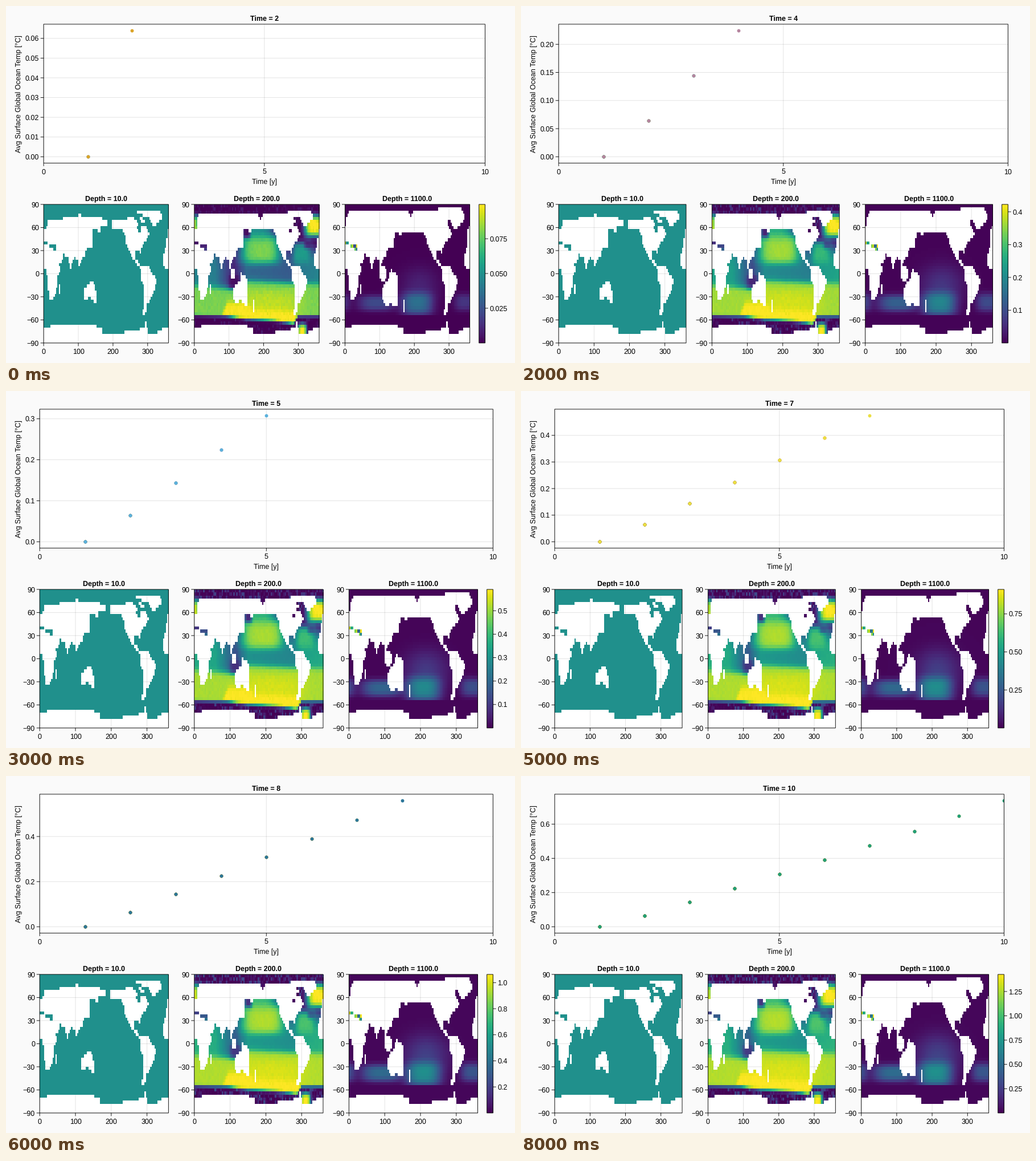
A matplotlib script for the animation above (9000 ms loop, 894 by 626 pixels).

```python
import numpy as np
import matplotlib.pyplot as plt
from matplotlib.animation import FuncAnimation
from matplotlib.patches import Rectangle
from matplotlib.path import Path

W, H, DPI = 894, 626, 64
PX = 72 / DPI
LW = 0.894 * PX
plt.rcParams.update({"font.family": "Liberation Sans", "font.size": 12.516 * PX,
                     "text.hinting": "none"})

TOP, BOTTOM = (31.9, 275.4), (347.9, 590.9)
TEMP = [0, 0.064, 0.144, 0.2246, 0.308, 0.391, 0.4747, 0.5595, 0.648, 0.738]
STEPS = [0.01, 0.05, 0.05, 0.1, 0.1, 0.1, 0.2, 0.2, 0.2]
BAR_STEPS = [0.025, 0.05, 0.1, 0.1, 0.2, 0.25, 0.2, 0.25, 0.25]
CYCLE = ["#2c7699", "#dba428", "#21a077", "#b5859f", "#5bb1dc", "#d95f02", "#ebdf42"]

# 4 degree ocean grid
LON, LAT = np.meshgrid(np.arange(2, 360, 4), np.arange(88, -90, -4))
CELLS = np.column_stack([LON.ravel(), LAT.ravel()])


def inside(*shapes):
    hit = np.zeros(LON.size, bool)
    for s in shapes:
        hit |= Path(s + s[:1]).contains_points(CELLS)
    return hit.reshape(LON.shape)


def grow(mask, n):
    """Widen a mask by n cells in the four directions."""
    for _ in range(n):
        mask = mask | sum(np.roll(mask, d, a) for d in (1, -1) for a in (0, 1)) > 0
    return mask


# coast key points as (longitude, latitude)
OLD_WORLD = [
    (0, 58), (9, 58), (12, 70), (52, 71), (60, 74), (94, 74), (104, 79), (114, 74),
    (150, 74), (183, 70), (183, 62), (163, 60), (163, 52), (156, 57), (142, 58),
    (140, 36), (122, 31), (118, 23), (108, 18), (104, 9), (98, 16), (90, 22), (78, 7),
    (70, 22), (57, 25), (58, 20), (45, 12), (51, 11), (40, -5), (40, -16), (27, -35),
    (19, -35), (12, -16), (9, 4), (0, 5)]
WEST_EDGE = [(360, 58), (354, 58), (356, 48), (351, 42), (351, 36), (343, 21),
             (343, 14), (352, 4), (360, 5)]
MEDITERRANEAN = [(0, 42), (10, 42), (14, 38), (36, 38), (36, 30), (10, 38), (0, 38)]
NORTH_AMERICA = [
    (196, 70), (260, 73), (272, 66), (266, 57), (279, 54), (283, 63), (296, 60),
    (304, 52), (298, 46), (284, 38), (279, 25), (276, 30), (264, 30), (262, 21),
    (272, 18), (281, 8), (277, 7), (262, 16), (248, 28), (236, 39), (235, 48),
    (228, 58), (202, 57), (196, 61)]
GREENLAND = [(268, 82), (336, 82), (340, 71), (316, 59), (309, 66), (303, 75), (268, 77)]
BAFFIN = [(272, 74), (284, 73), (298, 66), (284, 65)]
SOUTH_AMERICA = [(280, 8), (300, 11), (312, 1), (325, -6), (320, -21), (306, -34),
                 (298, -40), (293, -55), (285, -55), (289, -18), (279, -5)]
AUSTRALIA = [(114, -22), (130, -12), (143, -10), (153, -26), (150, -38), (132, -31),
             (115, -35)]
MADAGASCAR = [(44, -16), (50, -13), (47, -26), (43, -26)]
NEW_GUINEA = [(131, 1), (150, -5), (152, -18), (132, -14)]
SUNDA = [(103, 6), (118, 5), (117, -6), (106, -5)]

med = inside(MEDITERRANEAN)
land = inside(OLD_WORLD, WEST_EDGE) & ~med
land |= inside(NORTH_AMERICA, GREENLAND, BAFFIN, SOUTH_AMERICA, AUSTRALIA, MADAGASCAR)
land |= LAT < np.interp(LON, [0, 40, 140, 165, 170, 212, 260, 288, 295, 300, 322, 345],
                        [-70, -66, -66, -70, -78, -78, -73, -71, -62, -78, -78, -70])

# shallow seas turn into land further down
arctic = (LAT > 56) & (LAT < 79) & (LON > 9) & (LON < 285)
indies = (abs(LAT + 16) < 28) & (abs(LON - 126) < 28)
land_mid = land | inside(NEW_GUINEA, SUNDA) | grow(land, 2) & arctic
land_mid |= grow(land, 1) & indies & (LON > 100)
land_mid |= (LON == 170) & (abs(LAT + 41) < 8)
land_deep = land_mid | grow(land_mid, 1) & (indies | (LAT > 44) & (LAT < 86))


def rise(x, width):
    return 1 / (1 + np.exp(-x / width))


def bump(cx, cy, rx, ry, power):
    dx = (LON - cx + 180) % 360 - 180
    return np.exp(-np.abs(dx / rx) ** power - np.abs((LAT - cy) / ry) ** power)


def blend(base, val, w):
    return base * (1 - w) + val * w


# 200 m: tropics by longitude, warm southern belt, then single basins
rng = np.random.RandomState(4)
mid = np.interp(LON, [0, 60, 90, 115, 150, 280, 300, 360],
                [0.45, 0.42, 0.22, 0.1, 0.34, 0.28, 0.4, 0.45]) * rise(30 - LAT, 5)
north = np.interp(LON, [0, 140, 155, 285, 360], [-15, -20, -9, -12, -13])
south = np.interp(LON, [0, 90, 150, 230, 285, 298], [-54, -55, -59, -61, -65, -55])
core = np.interp(LON, [75, 95, 145, 170, 285, 295], [-58, -37, -38, -46, -48, -60])
belt = 0.8 + 0.1 * rise(-22 - LAT, 4) * bump(220, -35, 90, 40, 4)
belt = blend(belt, 1, rise(core - LAT, 2))
mid = blend(mid, belt, rise(north - LAT, 2))
mid *= rise(LAT - south, 0.7)
for val, *shape in [
        (0.5, 180, 51, 46, 13), (0.64, 188, 33, 60, 19), (0.8, 192, 30, 46, 16),
        (0.55, 308, 27, 26, 14), (0.1, 326, 41, 11, 8), (0.04, 114, -10, 17, 9),
        (0.03, 150, 54, 11, 8), (1, 345, 62, 29, 14), (1, 310, -74, 12, 9)]:
    mid = blend(mid, val, bump(*shape, 4))
mid += 0.08 * (abs(LAT) > 58) * rng.rand(*LON.shape) ** 6
mid = np.clip(mid * (1 + 0.012 * rng.randn(*LON.shape)), 0, 1)

# 1100 m: three southern gyres and a faint tropical plume
deep = (0.34 * bump(208, -39, 44, 15, 3) + 0.09 * bump(215, -14, 52, 22, 2)
        + 0.22 * bump(92, -38, 52, 10, 3) + 0.15 * bump(345, -37, 30, 11, 3))
deep = 0.003 + deep * (LAT > -55)
deep[med] = rng.rand(med.sum())


def heat(t):
    """The three depth slices, scaled to the colorbar of year t."""
    g = 0.5 + 1.41 / t ** 1.5
    return [np.where(m, np.nan, v) for m, v in (
        (land, np.full(LON.shape, 0.5)), (land_mid, mid ** g),
        (land_deep, deep ** g ** 0.6))]


fig = plt.figure(figsize=(W / DPI, H / DPI), dpi=DPI, facecolor="#fafafa")
ax = fig.add_axes([0, 0, 1, 1])


def line(x, y, alpha=1, z=4):
    ax.plot(x, y, color="black", lw=LW, alpha=alpha, zorder=z,
            solid_capstyle="butt", snap=False)


def label(x, y, s, ha="center", **kw):
    ax.text(x, y, s, ha=ha, va="baseline", **kw)


def frame(x0, x1, y0, y1):
    size = (x0, y0), x1 - x0, y1 - y0
    box = ax.add_patch(Rectangle(*size, fc="white", ec="none", zorder=0))
    ax.add_patch(Rectangle(*size, fill=False, ec="black", lw=LW, zorder=5, snap=False))
    return box


def axes_box(x0, x1, y0, y1, xticks, yticks, title):
    """Draw a framed plot area; ticks are (pixel, text) pairs."""
    box = frame(x0, x1, y0, y1)
    for x, s in xticks:
        line([x, x], [y0, y1], 0.12, 1)
        line([x, x], [y1, y1 + 5.4])
        label(x, y1 + 19.3, s)
    for y, s in yticks:
        line([x0, x1], [y, y], 0.12, 1)
        line([x0 - 5.4, x0], [y, y])
        label(x0 - 8.1, y + 4.5, s, "right")
    label((x0 + x1) / 2, y0 - 6.1, title, weight="bold")
    return box


def picture(data, x0, x1, y0, y1):
    ax.imshow(data, cmap="viridis", vmin=0, vmax=1, extent=(x0, x1, y1, y0),
              aspect="auto", interpolation="nearest", zorder=2)


def ticks(step, top, start=0):
    """Labelled multiples of step up to top, and their number of decimals."""
    places = len(f"{step:g}") - 2
    vals = step * np.arange(start, int(top / step + 1e-9) + 1)
    return [(v, f"{v:.{places}f}") for v in vals], places


def draw_series(t, left, right, yticks):
    y0, y1 = TOP
    peak = TEMP[t - 1]

    def xpos(v):
        return left + v / 10 * (right - left)

    def ypos(v):
        return y1 - (v / peak + 0.05) / 1.1 * (y1 - y0)

    box = axes_box(left, right, y0, y1, [(xpos(v), str(v)) for v in (0, 5, 10)],
                   [(ypos(v), s) for v, s in yticks], f"Time = {t}")
    # every year adds a new layer of dots over the older ones
    for k in range(1, t + 1):
        dots, = ax.plot(xpos(np.arange(1, k + 1)), [ypos(v) for v in TEMP[:k]], "o",
                        color=CYCLE[(k - 1) % len(CYCLE)], ms=5.9 * PX, mew=0, zorder=3)
        dots.set_clip_path(box)
    label((left + right) / 2, 312, "Time [y]")
    label(26, (y0 + y1) / 2, "Avg Surface Global Ocean Temp [°C]", rotation=90,
          rotation_mode="anchor")


def draw_maps(t, left, right):
    y0, y1 = BOTTOM
    gap = 45.4
    width = (right - left - 26.8 - 2 * gap) / 3
    yticks = [(y0 + (90 - v) / 180 * (y1 - y0), str(v).replace("-", "\u2212"))
              for v in range(-90, 91, 30)]
    for k, (depth, data) in enumerate(zip((10.0, 200.0, 1100.0), heat(t))):
        x0 = left + k * (width + gap)
        xticks = [(x0 + v / 360 * width, str(v)) for v in range(0, 301, 100)]
        axes_box(x0, x0 + width, y0, y1, xticks, yticks, f"Depth = {depth}")
        picture(data, x0, x0 + width, y0, y1)


def draw_bar(right, top, marks):
    y0, y1 = BOTTOM
    frame(right - 10.7, right, y0, y1)
    picture(np.linspace(1, 0, 256)[:, None], right - 10.7, right, y0, y1)
    for v, s in marks:
        y = y1 - v / top * (y1 - y0)
        line([right, right + 5.4], [y, y])
        label(right + 8.1, y + 4.5, s, "left")


def draw(i):
    t = i + 2
    ax.cla()
    ax.set_axis_off()
    ax.set(xlim=(0, W), ylim=(H, 0))
    ax.autoscale(False)

    bar_top = np.interp(t, [2, 4, 6, 8, 10], [0.0997, 0.4226, 0.759, 1.063, 1.426])
    yticks, places = ticks(STEPS[i], 1.05 * TEMP[t - 1])
    marks, bar_places = ticks(BAR_STEPS[i], bar_top, 1)
    # wider tick labels squeeze the plots
    left = 52.2 + 6.96 * places
    right = 862.3 - 6.96 * bar_places
    draw_series(t, left, right, yticks)
    draw_maps(t, left, right)
    draw_bar(right, bar_top, marks)
    return []


anim = FuncAnimation(fig, draw, frames=9, init_func=lambda: [], interval=1000,
                     repeat=True, repeat_delay=0, blit=False)
plt.show()
```
